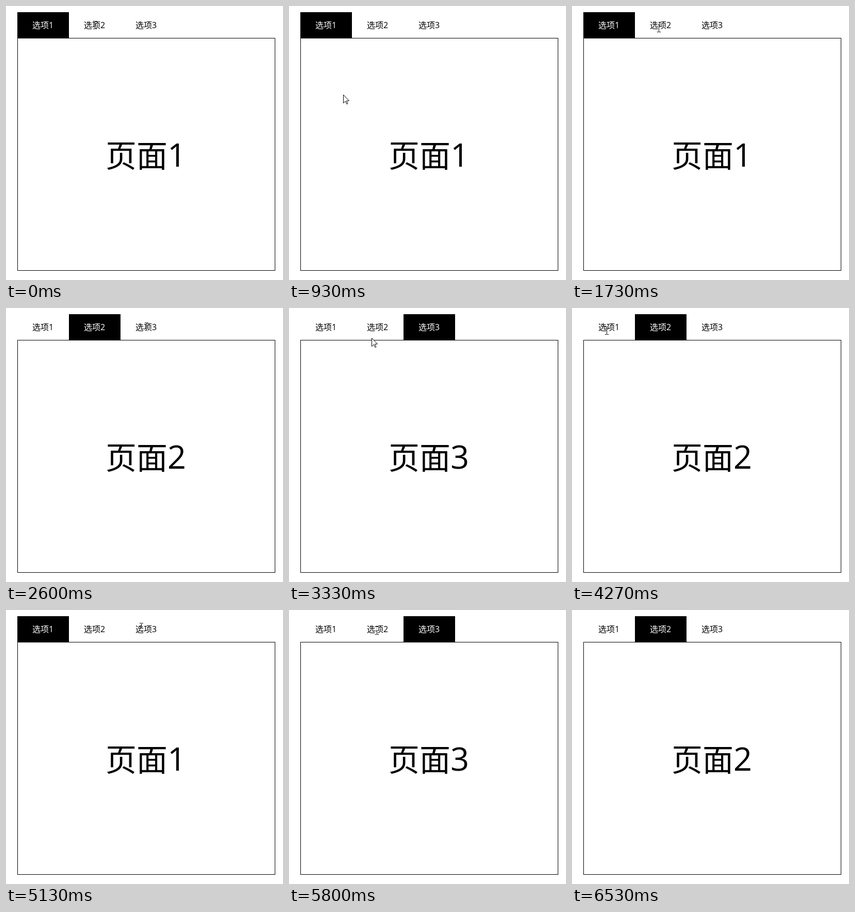
An HTML page that plays this animation: 537 by 532 pixels, repeating every 7190 ms.

```html
<!DOCTYPE html>
<html lang="zh-CN">
<head>
<meta charset="utf-8">
<title>选项</title>
<style>
  html, body { margin: 0; width: 100%; height: 100%; overflow: hidden; background: #fff; }
  svg { display: block; font-family: "Open Sans", "Noto Sans CJK SC", "Noto Sans CJK", sans-serif; }
  .tab rect { fill: none; }
  .tab.on rect { fill: #000; }
  .tab.on text { fill: #fff; }
  #beam { fill: none; stroke: #fff; mix-blend-mode: difference; shape-rendering: crispEdges; }
</style>
</head>
<body>
<svg width="537" height="532" viewBox="0 0 537 532">
  <rect width="537" height="532" fill="#fff"/>
  <g id="tabs"></g>
  <rect x="22.5" y="62.5" width="499" height="451" fill="none" stroke="#000"/>
  <text x="193" y="313" font-size="60">页面</text>
  <text id="digit" x="313" y="312" font-size="63"></text>
  <path id="beam" d="M-3 -7.5H0M1 -7.5H4M-3 7.5H0M1 7.5H4M.5 -7V7"/>
  <path id="arrow" d="M.5 .5V16.5L4.3 13L7 18.5L9 17.6L6.5 12H11.5Z" fill="#fff" stroke="#000"/>
</svg>
<script>
const LOOP = 7190, TICK = 1000 / 15;
const $ = id => document.getElementById(id);

// Each move runs between two ticks to a point; a page is clicked as the move begins.
const moves = [
  { from: 5, to: 16, x: 118, y: 103, sway: 380, sag: 275 },
  { from: 16, to: 26, x: 168, y: 43 },
  { from: 29, to: 35, x: 269, y: 33, page: 2 },
  { from: 36, to: 39, x: 272, y: 36 },
  { from: 44, to: 50, x: 160, y: 58, page: 3 },
  { from: 50, to: 54, x: 168, y: 42 },
  { from: 56, to: 64, x: 67, y: 44, page: 2 },
  { from: 67, to: 77, x: 262, y: 33, page: 1 },
  { from: 80, to: 87, x: 170, y: 40, page: 3 },
  { from: 90, to: 98, x: 110, y: 545, page: 2 }
];

$("tabs").innerHTML = [1, 2, 3].map(n => {
  const x = 100 * n - 78;
  return `<g class="tab"><rect x="${x}" y="12" width="100" height="50"/>
    <text x="${x + 29}" y="43" font-size="16">选项${n}</text></g>`;
}).join("");
const tabs = [...$("tabs").children];

const ease = u => u * u * (3 - 2 * u);

function stateAt(tick) {
  let x = 172, y = 37, page = 1;
  for (const m of moves) {
    if (tick < m.from) break;
    const u = ease(Math.min(1, (tick - m.from) / (m.to - m.from)));
    x += (m.x - x) * u + (m.sway || 0) * (1 - u) * Math.sin(2 * Math.PI * u);
    y += (m.y - y) * u + (m.sag || 0) * Math.sin(Math.PI * u);
    page = m.page || page;
  }
  return { x: Math.round(x), y: Math.round(y), page };
}

const overText = (x, y) => y >= 27 && y < 48 && x >= 51 && x < 293 && (x - 51) % 100 < 42;

function place(node, visible, x, y) {
  node.style.display = visible ? "" : "none";
  node.setAttribute("transform", `translate(${x} ${y})`);
}

function draw(time) {
  const { x, y, page } = stateAt(Math.floor((time % LOOP + 5) / TICK));
  tabs.forEach((tab, i) => tab.classList.toggle("on", i + 1 === page));
  $("digit").textContent = page;
  const text = overText(x, y);
  place($("beam"), text, x, y);
  place($("arrow"), !text, x, y);
}

const start = performance.now();
function frame() {
  draw(performance.now() - start);
  requestAnimationFrame(frame);
}
frame();
</script>
</body>
</html>
```
